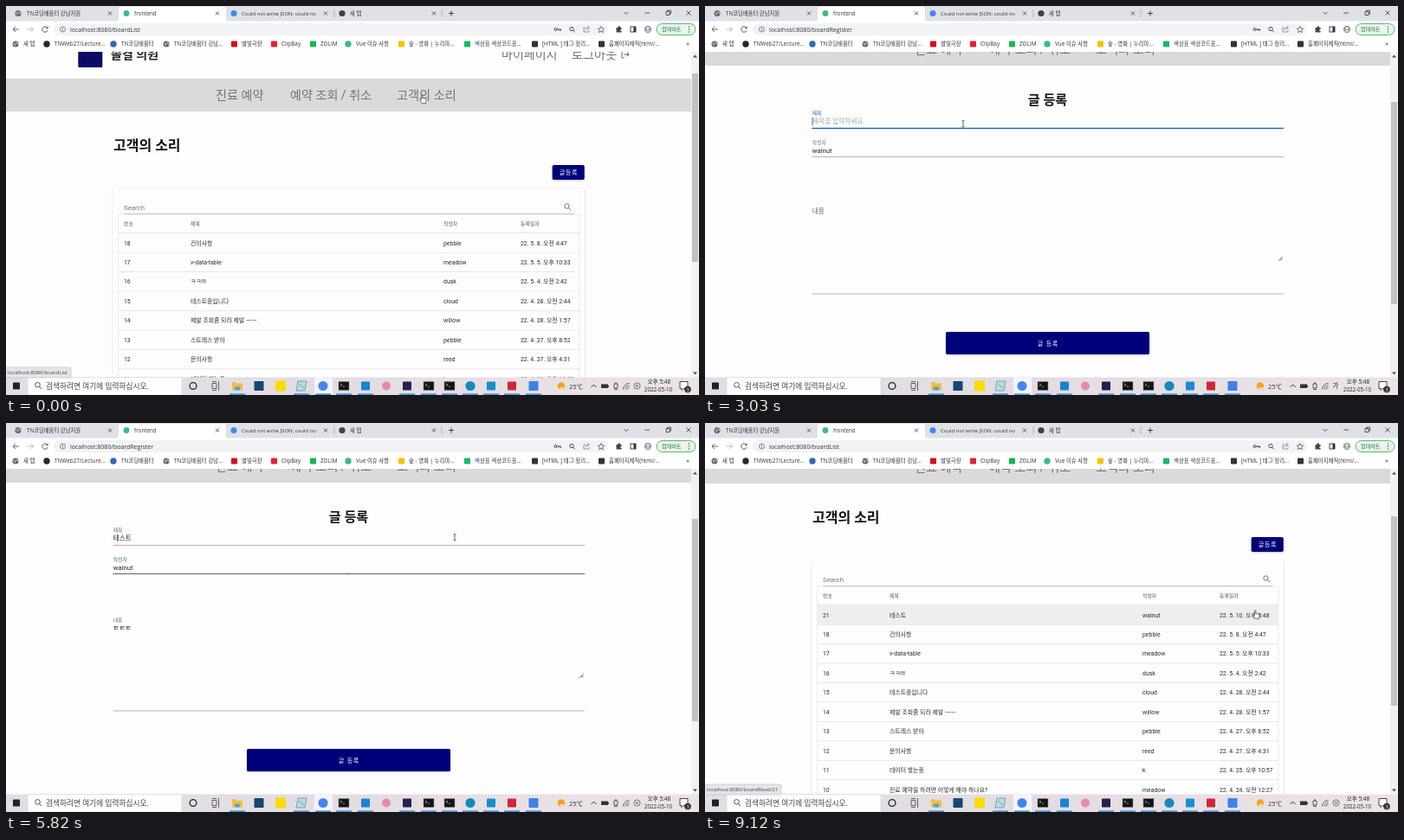
These frames come from a looping animation (800x450 px, 9.15 s). An HTML page:

```html
<!DOCTYPE html>
<html lang="ko">
<head>
<meta charset="utf-8">
<title>Board</title>
<style>
html, body { margin: 0; width: 100%; height: 100%; overflow: hidden; background: #fff; }
svg { display: block; width: 800px; height: 450px; font-family: "Open Sans", "Noto Sans CJK KR", sans-serif; }
svg svg { width: auto; height: auto; }
text { white-space: pre; }
.page { font-family: Roboto, "Noto Sans CJK KR", sans-serif; }
</style>
</head>
<body>
<svg id="stage" viewBox="0 0 800 450">
  <defs>
    <filter id="shade" x="-10%" y="-30%" width="120%" height="170%">
      <feDropShadow dx="0" dy=".8" stdDeviation="1" flood-opacity=".25"/>
    </filter>
    <linearGradient id="bar"><stop stop-color="#e0dfe5"/><stop offset=".5" stop-color="#e3dde3"/><stop offset="1" stop-color="#ebe3e6"/></linearGradient>
    <clipPath id="picked"><rect id="pick" x="123.5" y="160" width="0" height="14"/></clipPath>
  </defs>
  <g id="page" class="page"></g>
  <g id="chrome"></g>
  <g id="live"></g>
</svg>
<script>
const LOOP = 9150, NAVY = '#00007a', BLUE = '#1867c0';
const $ = id => document.getElementById(id);

// Drawing helpers; text is placed by its vertical centre.
const T = (s, x, cy, size, fill = '#333', more = '') =>
  `<text x="${x}" y="${cy + size * .37}" font-size="${size}" fill="${fill}" ${more}>${s}</text>`;
const R = (x, y, w, h, fill, more = '') =>
  `<rect x="${x}" y="${y}" width="${w}" height="${h}" fill="${fill}" ${more}/>`;
const O = (x, y, r, fill, more = '') => `<circle cx="${x}" cy="${y}" r="${r}" fill="${fill}" ${more}/>`;
const P = (d, stroke = '#444', w = .8, fill = 'none') =>
  `<path d="${d}" stroke="${stroke}" stroke-width="${w}" fill="${fill}"/>`;
const S = (x, y, size, fill) => R(x - size / 2, y - size / 2, size, size, fill, 'rx=".8"');
const H = (x, y, w, fill, h = .7) => R(x, y - h / 2, w, h, fill);
const globe = (x, y) => O(x, y, 3.5, '#5f6368') + P(`M${x - 2.5} ${y - 1}l2 1l-.5 2M${x + .5} ${y - 2.5}l1 2l1.5 .5`, '#fff', .8);
const lens = (x, y, r, c = '#444') => O(x, y, r, 'none', `stroke="${c}" stroke-width=".9"`) +
  P(`M${x + r * .7} ${y + r * .7}l${r} ${r}`, c, 1);
const cross = (x, y, r = 2) => P(`M${x - r} ${y - r}l${2 * r} ${2 * r}m0 ${-2 * r}l${-2 * r} ${2 * r}`, '#333', .8);

const ramp = (t, a, b) => Math.max(0, Math.min(1, (t - a) / (b - a)));
const ease = p => p * p * (3 - 2 * p);
const mix = (a, b, p) => a + (b - a) * p;

function tabs() {
  let s = R(0, 0, 800, 18, '#dee1e6') + P('M127 18q3 0 3-3V4q0-3 3-3H251q3 0 3 3V15q0 3 3 3z', 'none', 0, '#fff');
  s += globe(14, 8.5) + O(139, 8.5, 3.4, '#41b883') + O(263, 8.5, 3.5, '#4285f4') + O(388, 8.5, 3.6, '#3c4043');
  ['TN코딩배움터 강남지원', 'frontend', 'Could not write JSON: could no', '새 탭'].forEach((name, i) => {
    s += T(name, [24, 148, 272, 397][i], 8.5, i == 2 ? 6 : 6.3) + cross([120, 244, 369, 494][i], 8.5);
  });
  s += P('M379 4v9M503 4v9', '#9a9da2', .6) + P('M514 5.5v6m-3-3h6', '#333', .9);
  s += P('M713.5 7l2.5 2.5l2.5-2.5M737.5 8h5.5M762 6.5h4v4h-4zM763.5 6.5v-1.5h4v4h-1.5', '#333', .8) + cross(788, 8, 2.6);
  return s;
}

function toolbar() {
  let s = R(0, 17.5, 800, 35.5, '#fff');
  s += P('M15 27h-7m3-3l-3 3l3 3') + P('M24.500 27h7m-3-3l3 3l-3 3', '#aaa') + P('M47.500 25a3.200 3.200 0 1 0 .6 3M48.200 23.500v2.300h-2.300', '#444', .9);
  s += R(55, 20, 640, 14, '#f1f3f4', 'rx="7"') + O(65.5, 27, 3, 'none', 'stroke="#555" stroke-width=".7"') + P('M65.500 26.500v2m0-3.300v.7', '#555', .8);
  s += O(634.5, 27, 1.5, 'none', 'stroke="#444"') + P('M636 27h4.500v1.700m-1.700-1.700v1.500', '#444', 1) + lens(653, 26.5, 2.2);
  s += P('M669 25h-2v5h6v-2M669 28q0-3 4-3m-2-2l2.500 2l-2.500 2', '#777', .7);
  s += P('M687 23.500l1.100 2.400l2.600.3l-2 1.800l.6 2.600l-2.300-1.300l-2.300 1.300l.6-2.600l-2-1.800l2.600-.3z', '#444', .7);
  s += P('M704.500 25h2q0-2 1.300-2t1.300 2h1.500v2q-1.500 0-1.500 1t1.500 1v1.500h-6z', 'none', 0, '#444');
  s += R(721, 24, 6, 6, 'none', 'stroke="#333" stroke-width=".9"') + R(724.5, 24, 2.5, 6, '#333');
  s += O(741, 27, 4.2, '#9aa0a6') + O(741, 25.8, 1.5, '#eee') + P('M738.200 29.500q2.800-3 5.600 0z', 'none', 0, '#eee');
  s += R(751, 20.5, 45, 13, '#eaf4ec', 'rx="6.500" stroke="#34a853" stroke-width=".8"') + T('업데이트', 757, 27, 6.1, '#137333');
  s += [24, 27, 30].map(y => O(788.5, y, .75, '#137333')).join('');
  return s;
}

function bookmarks() {
  const items = [
    [20, '새 탭'], [56, 'TNWeb27/Lecture...', '#24292e', 1], [133, 'TN코딩배움터', '#3469b5', 1],
    [194, 'TN코딩배움터 강남...'], [272, '별빛극장', '#d5121c'], [318, 'ClipBay', '#e3242b'],
    [363, 'ZOLIM', '#17b84b'], [404, 'Vue 이슈 사항', '#41b883', 1], [465, '숲 - 영화 | 누리마...', '#f2c300'],
    [541, '색상표 색상코드표...', '#18b868'], [619, '[HTML ] 태그 정리...', '#333'], [696, '홈페이지제작(html/...', '#333']
  ];
  return items.map(([x, name, color, round]) =>
    (!color ? globe(x - 9, 44) : round ? O(x - 9, 44, 3.7, color) : S(x - 8.5, 44, 7, color)) +
    T(name, x, 44, 6.4)).join('') + T('»', 785, 43.5, 8);
}

function taskbar() {
  let s = R(0, 429.5, 800, 21, 'url(#bar)') + R(25, 429.5, 178, 20.5, '#fdfdfd', 'stroke="#ccc" stroke-width=".5"');
  s += S(12, 439.5, 8, '#222') + lens(36.5, 438.3, 2.8) + T('검색하려면 여기에 입력하십시오.', 46, 439.5, 8.7, '#444');
  s += O(216, 439.5, 3.9, 'none', 'stroke="#222" stroke-width="1.300"');
  s += P('M238 436.500h5v6h-5zM238 434.500h5M238 444.500h5M245.500 434v11', '#444', .8);
  s += R(356, 430, 21, 20, '#f6f4f8');
  s += P('M261 435h4l1 1.500h7v8h-12z', 'none', 0, '#f3bd40') + R(264, 440.5, 6, 4, '#4ba4dc');
  s += P('M335 445l2-11h10l-2 11z', '#5a8792', .7, '#b9dce2') + P('M338 437l6 5', '#5a8792', .7);
  s += S(292, 439.5, 11, '#17466e') + S(317, 439.5, 12, '#f9dc00') + O(366, 439.5, 5.5, '#4285f4');
  [390, 488, 512].forEach(x => {
    s += R(x - 6, 434.5, 12, 10, '#151515', 'stroke="#888" stroke-width=".5"') + P(`M${x - 4} 437l2 1.300l-2 1.300m3 .5h2`, '#eee', .6);
  });
  s += S(415, 439.5, 10, '#1784cf') + O(439, 439.5, 5, '#e58ba8') + S(463, 439.5, 10, '#26204b');
  s += O(536, 439.5, 5.6, '#1689bd') + S(560, 439.5, 10, '#198ecf') + S(584, 439.5, 10, '#cf2638') + S(609, 439.5, 11, '#3d82e8');
  [267, 341, 366, 390, 415, 463, 488, 512, 536, 560, 584, 609].forEach(x => s += R(x - 9, 448.3, 18, 1.7, '#4a91cf'));
  s += O(641, 439.5, 4.3, '#f5a51d') + R(639, 441, 7, 3, '#e8d6bd', 'rx="1.500"') + T('25℃', 650, 440, 7.4);
  s += P('M675.500 441l3-3l3 3', '#222', .9) + R(687, 437.5, 8, 4.5, '#333') + R(695, 438.8, 1, 2, '#333');
  s += P('M702 437h4v5h-4zM704 435v2M702 443.500h4', '#333', .8);
  s += P('M712.500 443.500a7 7 0 0 1 7-7m-4.500 7a4.500 4.500 0 0 1 4.500-4.500m-2.200 4.500a2.200 2.200 0 0 1 2.200-2.200', '#444', .8);
  s += T('오후 5:48', 754, 435, 6.5, '#222', 'text-anchor="middle"') + T('2022-05-10', 753, 443.8, 6.2, '#222', 'text-anchor="middle"');
  s += P('M778 434.500h9v8h-5l-2 2v-2h-2z', '#333', .9, '#fff') + O(787, 443.5, 3.8, '#333') + T('3', 785.4, 443.5, 5.5, '#fff');
  return s;
}

const posts = [
  [21, '테스트', 'walnut', '5. 10. 오후 5:48'], [18, '건의사항', 'pebble', '5. 8. 오전 4:47'],
  [17, 'v-data-table', 'meadow', '5. 5. 오후 10:33'], [16, 'ㅋㅋ!!!', 'dusk', '5. 4. 오전 2:42'],
  [15, '테스트중입니다', 'cloud', '4. 28. 오전 2:44'], [14, '제발 조회좀 되라 제발 ㅡㅡ', 'willow', '4. 28. 오전 1:57'],
  [13, '스트레스 받아', 'pebble', '4. 27. 오후 8:52'], [12, '문의사항', 'reed', '4. 27. 오후 4:31'],
  [11, '데이터 쌓는중', 'k', '4. 25. 오후 10:57'], [10, '진료 예약을 하려면 어떻게 해야 하나요?', 'meadow', '4. 24. 오전 12:27']
];
const columns = [136, 213, 505, 594];

// Site header; dy is the scroll offset.
function header(dy) {
  const grey = '#757475';
  return R(0, 50, 800, 385, '#fdfdfd') + S(97.3, 57 + dy, 28, '#0b0b66') + T('솔결 의원', 121, 56.2 + dy, 14, '#222', 'font-weight="700"') +
    T('마이페이지', 572, 56.2 + dy, 14, grey) + T('로그아웃', 653, 56.2 + dy, 14.2, grey) +
    P(`M714 ${52 + dy}h-3v8h3M713 ${56 + dy}h6m-2-2l2 2l-2 2`, grey, 1.1) +
    R(0, 84 + dy, 791, 38, '#dbd9db') + T('진료 예약', 242, 102.5 + dy, 14.1, grey) +
    T('예약 조회 / 취소', 328, 102.5 + dy, 14.1, grey) + T('고객의 소리', 451, 102.5 + dy, 14.2, grey);
}

function list(dy, rows, hovered) {
  let s = T('고객의 소리', 124, 160.8 + dy, 16, '#111', 'font-weight="700"');
  s += R(630.7, 184 + dy, 37, 17, NAVY, 'rx="1.700" filter="url(#shade)"') + T('글등록', 639, 192.5 + dy, 6.9, '#fff', 'letter-spacing=".6" font-weight="500"');
  s += R(123.5, 211 + dy, 544.5, 300, '#fefefe', 'rx="1.700" filter="url(#shade)" opacity=".9"');
  s += T('Search', 136, 232.7 + dy, 7.8, '#757575') + lens(647.5, 231.5 + dy, 2.7, '#666') + H(136, 240.7 + dy, 519, '#969696');
  s += R(129.5, 241 + dy, 532.5, 260, 'none', 'stroke="#e2e2e2" stroke-width=".6"');
  ['번호', '제목', '작성자', '등록일자'].forEach((name, i) => s += T(name, columns[i], 251.5 + dy, 5.9, '#555', 'font-weight="500"'));
  rows.forEach(([id, title, writer, date], i) => {
    const y = 274 + dy + 22.45 * i;
    if (id == hovered) s += R(129.5, y - 11.3, 532.5, 22.5, '#eee');
    s += H(129.5, y - 11.3, 532.5, '#dedede');
    [id, title, writer, '22. ' + date].forEach((v, c) => s += T(v, columns[c], y, 6.9, '#2b2b2b'));
  });
  return s;
}

// Focus windows of the three fields.
const TITLE = [2700, 3850], BODY = [3850, 4320], WRITER = [4320, 5540];
const inside = (t, [a, b]) => t >= a && t < b;
const typed = (t, start, step, steps) => steps[Math.min(steps.length - 1, Math.floor((t - start) / step))] || '';

function field(t, { name, y, line, value, span, floats, hint = '', hot }) {
  const focused = inside(t, span), up = floats ? 1 : ease(ramp(t, span[0], span[0] + 250));
  const glow = ramp(t, span[0], span[0] + 200) - ramp(t, span[1] + 100, span[1] + 450);
  const color = `rgb(${mix(110, 24, glow)},${mix(110, 103, glow)},${mix(110, 192, glow)})`;
  const grow = ease(ramp(t, span[0], span[0] + 290)) - ease(ramp(t, span[1], span[1] + 292));
  let s = H(123.5, line, 544.5, hot ? '#222' : '#969696');
  if (grow > 0) { const w = 544.5 * grow; s += H(395.7 - w / 2, line, w, BLUE, 1.4); }
  s += T(name, 123.7, mix(y, y - 9.3, up), mix(7.8, 5.9, up), color);
  if (focused && !value) s += T(hint, 124, y, 7.7, '#aaa', `opacity="${up}"`);
  return s + T(value, 123.7, y, 7.7, '#222');
}

function form(t, [, mx, my]) {
  const over = (a, b) => mx > 123 && mx < 668 && my > a && my < b;
  const title = typed(t, 3080, 90, ['ㅌ', '테', '텟', '테스', '테슽', '테스트']);
  const body = typed(t, 4000, 80, ['ㅌ', 'ㅌㅌ', 'ㅌㅌㅌ']);
  let s = T('글 등록', 395.5, 108, 15.2, '#111', 'font-weight="700" text-anchor="middle"');
  s += field(t, { name: '제목', y: 133.3, line: 141.5, value: title, span: TITLE, hint: '제목을 입력하세요', hot: over(122, 142) && t > 6000 });
  s += field(t, { name: '작성자', y: 167, line: 174.4, value: 'walnut', span: WRITER, floats: true, hot: over(150, 176) || inside(t, [5540, 5900]) });
  s += field(t, { name: '내용', y: 236.8, line: 333, value: body, span: BODY, hint: '내용을 입력하세요', hot: over(220, 334) });
  s += P('M662.500 294.500l4-4M664.800 294.500l1.800-1.800', '#333', .8);
  const drag = ramp(t, 4450, 4570);
  if (drag && t < WRITER[1]) {
    $('pick').setAttribute('width', 23 * drag);
    s += `<g clip-path="url(#picked)">${R(123.5, 162, 23, 10, '#2f86dc') + T('walnut', 123.7, 167, 7.7, '#fff')}</g>`;
  }
  for (const [span, y, value] of [[TITLE, 133.5, title], [BODY, 237, body]])
    if (inside(t, span) && (t - span[0]) % 1000 < 500) s += R(123.7 + value.length * 7.1, y - 5, .7, 10, '#222');
  const fill = t > 6950 ? '#4b409d' : over(377, 403) && mx > 278 && mx < 513 ? '#1b1b8b' : NAVY;
  s += R(278, 377, 235, 26, fill, 'rx="1.700" filter="url(#shade)"');
  return s + T('글 등록', 396, 390.3, 6.9, '#fff', 'letter-spacing=".8" text-anchor="middle"');
}

const scrollbar = (top, bottom) => R(791, 53, 9, 376.5, '#f1f1f1') + R(792, top, 7, bottom - top, '#c1c1c1') +
  P('M793 59.500l2.500-3l2.500 3zM793 423.500l2.500 3l2.500-3z', 'none', 0, '#505050');

const alertBox = () => R(283, 34, 234, 68, '#fff', 'rx="2" filter="url(#shade)" stroke="#bbb" stroke-width=".6"') +
  T('localhost:8080 내용:', 292, 48.5, 7.7, '#202124') + T('게시물 등록 성공', 292, 63.5, 7, '#333') +
  R(474, 76.5, 34.5, 17.5, '#fff', 'rx="2.500" stroke="#1a66d0" stroke-width="1"') + R(475.3, 77.8, 32, 15, '#1a73e8', 'rx="1.500"') +
  T('확인', 491.3, 85.3, 6.2, '#fff', 'text-anchor="middle"');

const status = (text, w) => R(-1, 418, w, 12, '#e3e5e9', 'stroke="#bcbec2" stroke-width=".6" rx="1"') + T(text, 2, 424, 6, '#444');

const path = [
  [0, 482, 107], [200, 482, 107], [600, 649, 195], [820, 649, 195], [1180, 291, 160], [2000, 291, 160],
  [2550, 298, 136], [3450, 298, 136], [3780, 250, 240], [3980, 250, 240], [4300, 125, 168], [4430, 125, 168],
  [4640, 184, 177], [5000, 184, 177], [5450, 518, 132], [5950, 518, 132], [6500, 420, 390], [7150, 410, 388],
  [7580, 407, 21], [7820, 407, 21], [8150, 490, 86], [8420, 490, 86], [8950, 637, 221], [LOOP, 637, 221]
];
function pointer(t) {
  const i = path.findIndex(k => k[0] > t), [a, ax, ay] = path[i - 1], [b, bx, by] = path[i];
  const p = ease((t - a) / (b - a));
  return [t, mix(ax, bx, p), mix(ay, by, p)];
}

const shapes = {
  arrow: P('M-2-4v9l2-2l1.500 3.500l1.400-.6l-1.500-3.400h3z', '#222', .6, '#fff'),
  hand: P('M-2.500-4q.9-.8 1.400 0v3.500q1.400-.6 1.700.4q1.300-.5 1.600.6q1.200 0 1 1.500l-.7 3.600h-4.100l-2.600-3.800q0-1.300 1.700-.2z', '#222', .6, '#fff'),
  beam: P('M-1.500-3.500q1.500 0 1.500 1q0-1 1.500-1M0-2.500v6M-1.500 4q1.500 0 1.500-.8q0 .8 1.500 .8', '#222', .7)
};

function draw(now) {
  const t = now % LOOP, m = pointer(t), [, mx, my] = m;
  const first = t < 830, last = t >= 8380, popup = t >= 7100 && t < 8310;
  const dy = first ? 0 : last ? -52 : -53;
  const row = last && my > 211 && my < 234 ? 21 : 0;
  $('page').innerHTML = header(dy) + (first || last ? list(dy, last ? posts : posts.slice(1), row) : form(t, m)) +
    (first ? scrollbar(78, 296) : last ? scrollbar(108, 327) : scrollbar(111, 345));

  const onNav = first && my < 122 && mx < 521;
  const onButton = first && mx > 631 || !first && !last && !popup && my > 377;
  const onText = !first && !last && !popup && my > 120 && my < 334;
  let s = T('localhost:8080/' + (first || last ? 'boardList' : 'boardRegister'), 74, 27, 7.04, '#333');
  if (onNav) s += status('localhost:8080/boardList', 76);
  if (row) s += status('localhost:8080/boardRead/21', 89);
  s += inside(t, [TITLE[0], BODY[1]]) ? T('가', 724.5, 439.5, 7.5, '#222')
    : O(728.5, 439.5, 3.6, 'none', 'stroke="#444" stroke-width=".7"') + cross(728.5, 439.5, 1.4);
  if (popup) s += alertBox();
  const kind = onNav || onButton || row ? 'hand' : onText ? 'beam' : 'arrow';
  $('live').innerHTML = s + `<g transform="translate(${mx} ${my})">${shapes[kind]}</g>`;
  requestAnimationFrame(draw);
}

$('chrome').innerHTML = tabs() + toolbar() + bookmarks() + taskbar();
requestAnimationFrame(draw);
</script>
</body>
</html>
```
